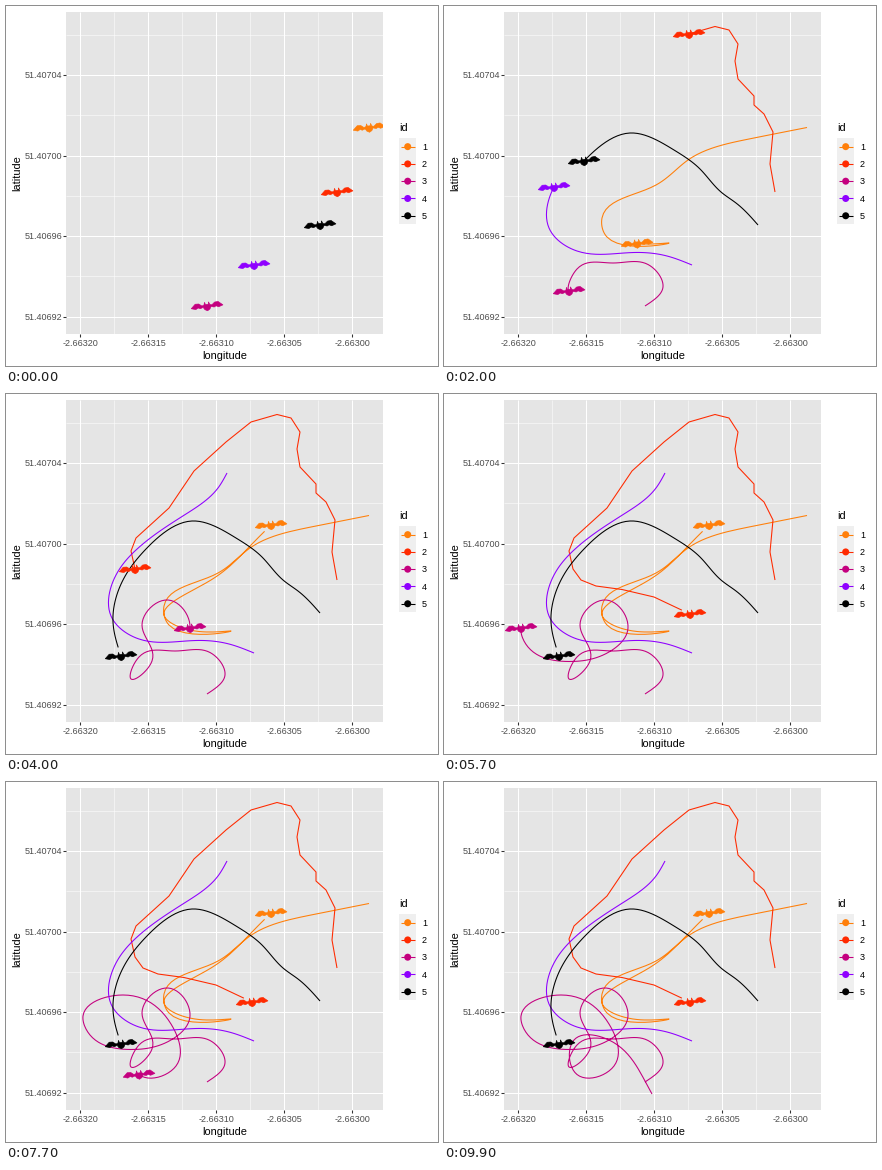
Animation of 432x360 px, one loop 10 s. Source, as a matplotlib script:

```python
import numpy as np
import matplotlib.pyplot as plt
from matplotlib.animation import FuncAnimation
from matplotlib.patches import Circle, Polygon, Rectangle

plt.rcParams["font.family"] = "Liberation Sans"

W, H, DPI = 432, 360, 72
FRAMES, INTERVAL = 100, 100
LEFT, TOP, RIGHT, BOTTOM = 60, 5.5, 377, 328.3
LINE = 1.07
STEPS = 12   # samples between two key points
GAP = 9      # a resting bat sits this far past the end of its trail


def bat_shape(tilt=np.radians(-7)):
    """Half an outline from head to belly, mirrored and tilted."""
    half = np.array([(0, -1.6), (1.4, -1.6), (2, -4), (3, -1.2), (5, -.6),
                     (8, -3), (11.5, -3.2), (16, .8), (11.5, 2.2), (9, .9),
                     (7, 1.9), (4, .9), (2.5, 3.4), (0, 4.8)])
    c, s = np.cos(tilt), np.sin(tilt)
    return np.vstack([half, half[::-1] * (-1, 1)]) @ [[c, s], [-s, c]]


def spline(points, bent=True):
    """Natural cubic spline on chord lengths, or straight pieces."""
    p = np.array(points, float)
    h = np.hypot(*np.diff(p, axis=0).T)
    n = len(p)
    m = np.zeros((n, 2))
    if bent:
        a = np.eye(n)
        b = np.zeros((n, 2))
        slope = np.diff(p, axis=0) / h[:, None]
        for i in range(1, n - 1):
            a[i, i - 1:i + 2] = h[i - 1], 2 * (h[i - 1] + h[i]), h[i]
            b[i] = 6 * (slope[i] - slope[i - 1])
        m = np.linalg.solve(a, b)
    u = (np.arange(STEPS) / STEPS)[:, None]
    v = 1 - u
    parts = [v * p[i] + u * p[i + 1]
             + h[i]**2 / 6 * ((v**3 - v) * m[i] + (u**3 - u) * m[i + 1])
             for i in range(n - 1)]
    return np.vstack(parts + [p[-1:]])


class Track:
    """A flight path; keys maps a time step to the key point reached then."""

    def __init__(self, color, points, keys, bent=True, leaves=False):
        self.color, self.leaves = color, leaves
        self.xy = spline(points, bent)
        gaps = np.hypot(*np.diff(self.xy, axis=0).T)
        self.dist = np.concatenate([[0], np.cumsum(gaps)])
        self.times = [0, *keys]
        self.marks = [0, *(self.dist[i * STEPS] for i in keys.values())]

    def done(self, t):
        return t > self.times[-1]

    def point(self, s):
        return np.array([np.interp(s, self.dist, c) for c in self.xy.T])

    def at(self, t):
        """Trail up to time t and the place of the bat."""
        s = np.interp(t, self.times, self.marks)
        end = s - GAP if self.done(t) and not self.leaves else s
        trail = np.vstack([self.xy[self.dist < end], self.point(end)])
        return trail, self.point(s)


orange = Track("#FF7F0A", [
    (363, 121.5), (305, 133), (244, 154), (212, 179), (158, 212), (163, 231),
    (225, 237), (193, 237.5), (158, 221), (205, 186), (244, 152), (265, 131)],
    {12: 4, 20: 7, 32: 11})

red = Track("#FF2A00", [
    (331, 186), (326, 158), (329, 126), (320, 108), (310, 99), (310, 90),
    (294, 73), (291, 55), (294, 38), (285, 24), (271, 20.5), (245, 28),
    (220, 48), (188, 77), (163, 114), (130, 144), (125, 157), (129, 175),
    (137, 186), (152, 192), (178, 195.5), (210, 203), (246, 220)],
    {12: 6, 20: 11, 40: 17, 53: 22}, bent=False)

magenta = Track("#C4007F", [
    (201, 300), (219, 281), (204, 258.5), (169, 257), (133, 263), (125, 285),
    (146, 267), (136, 231), (162, 206), (184, 234), (165, 258), (125, 267.5),
    (84, 253), (77, 234), (117, 213), (165, 242), (170, 284), (133, 292.5),
    (130, 258), (165, 258), (201, 299), (208, 312)],
    {12: 3, 20: 5, 40: 9, 57: 13, 77: 17, 92: 21}, leaves=True)

purple = Track("#8F00FF", [
    (248, 259), (223, 250), (190, 246.5), (133, 245), (105, 222), (110, 181),
    (130, 156), (180, 120), (212, 94), (221, 79)],
    {12: 3, 20: 5, 36: 9}, leaves=True)

black = Track("#000000", [
    (314, 219), (292, 197), (277, 186), (256, 163), (230, 144), (186, 127),
    (140, 155), (116, 188), (107, 228), (115, 262)],
    {12: 4, 20: 6, 29: 9})

tracks = [orange, red, magenta, purple, black]

fig = plt.figure(figsize=(W / DPI, H / DPI), dpi=DPI, facecolor="white")
ax = fig.add_axes([0, 0, 1, 1])
ax.set(xlim=(0, W), ylim=(H, 0))
ax.axis("off")


def box(x, y, w, h, color):
    return ax.add_patch(Rectangle((x, y), w, h, fc=color, lw=0, zorder=0))


def rule(xs, ys, color="white", lw=LINE):
    ax.plot(xs, ys, color=color, lw=lw, solid_capstyle="butt", zorder=1)


def label(x, y, s, size=9, color="black", **kw):
    ax.text(x, y, s, size=size, color=color, va="baseline", **kw)


panel = box(LEFT, TOP, RIGHT - LEFT, BOTTOM - TOP, "#E5E5E5")
for i in range(4):
    x, y = 108.3 + 67.93 * i, 270.25 - 80.5 * i
    rule([x, x], [TOP, BOTTOM], lw=LINE / 2)
    rule([LEFT, RIGHT], [y, y], lw=LINE / 2)
for i in range(5):
    x = 74.3 + 67.93 * i
    rule([x, x], [TOP, BOTTOM])
    rule([x, x], [BOTTOM, BOTTOM + 2.7], "#333333")
    label(x, 340, f"{-2.6632 + i * 5e-5:.5f}", color="#4D4D4D", ha="center")
for i in range(4):
    y = 310.5 - 80.5 * i
    rule([LEFT, RIGHT], [y, y])
    rule([LEFT - 2.7, LEFT], [y, y], "#333333")
    label(56, y + 3.2, f"{51.40692 + i * 4e-5:.5f}", color="#4D4D4D", ha="right")
label(218.5, 353, "longitude", 11, ha="center")
label(14.3, 167, "latitude", 11, ha="center", rotation=90, rotation_mode="anchor")

KEY = 17.28
label(393, 125, "id", 11)
for i, tr in enumerate(tracks):
    y = 132 + i * KEY
    mid = y + KEY / 2
    box(393, y, KEY, KEY, "#EFEFEF")
    rule([394.7, 408.6], [mid, mid], tr.color)
    ax.add_patch(Circle((401.7, mid), 3.5, fc=tr.color, lw=0, zorder=3))
    label(416, mid + 3.2, str(i + 1))

BAT = bat_shape()
trails, bats = [], []
for tr in tracks:
    line, = ax.plot([], [], color=tr.color, lw=LINE, solid_capstyle="butt", zorder=3)
    bat = ax.add_patch(Polygon(BAT, fc=tr.color, ec=tr.color, lw=.6, zorder=4))
    for art in (line, bat):
        art.set_clip_path(panel)
    trails.append(line)
    bats.append(bat)


def update(t):
    for tr, line, bat in zip(tracks, trails, bats):
        trail, pos = tr.at(t)
        line.set_data(*trail.T)
        bat.set_xy(BAT + pos)
        bat.set_visible(not (tr.leaves and tr.done(t)))
    return trails + bats


anim = FuncAnimation(fig, update, frames=FRAMES, interval=INTERVAL,
                     repeat=True, repeat_delay=0)
plt.show()
```
